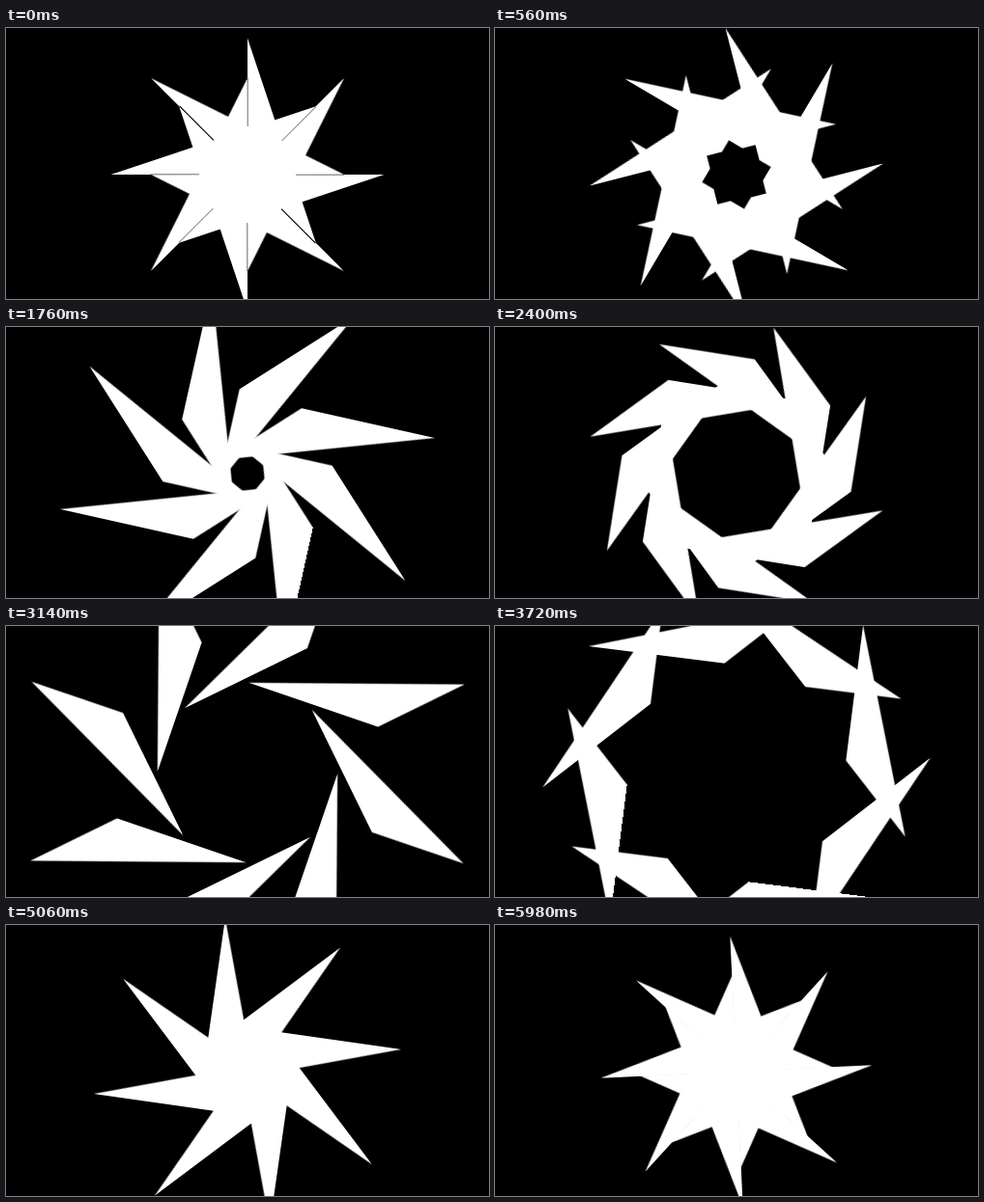
An HTML page that plays this animation: 500x281 px, repeating every 6000 ms.

```html
<!DOCTYPE html>
<html lang="en">
<head>
<meta charset="utf-8">
<title>Eight spinning blades</title>
<style>
  html, body { margin: 0; width: 100%; height: 100%; overflow: hidden; background: #000; }
  svg { display: block; }

  .blade {
    fill: #fff;
    transform-origin: 0 0;
    /* 20 ms ticks: 150 out, 150 back */
    animation: fly 6s steps(150, end) -4ms infinite;
  }
  .seam {
    fill: #999;
    animation: flash 6s step-end -4ms infinite;
  }
  .dark { fill: #000; }

  /* orbit 135deg, spin 675deg, distance 0 - 150 - 0 */
  @keyframes fly {
    0%   { transform: rotate(-45deg)  translateX(0px)   rotate(45deg); }
    50%  { transform: rotate(22.5deg) translateX(150px) rotate(382.5deg); }
    100% { transform: rotate(90deg)   translateX(0px)   rotate(720deg); }
  }
  /* the joints show only while the star is closed */
  @keyframes flash {
    0% { opacity: 1; }
    0.3333%, 100% { opacity: 0; }
  }
</style>
</head>
<body>
<svg width="500" height="281">
  <g id="star" transform="translate(250 152)"></g>
</svg>
<script>
  const star = document.getElementById('star');
  const side = 100, half = side * Math.SQRT1_2;
  const points = `${-2 * half},0 0,0 ${half},${-half}`;
  const turns = Array.from({ length: 8 }, (_, k) => k * 45);

  const ring = part => turns
    .map(a => `<g transform="rotate(${a})">${part(a)}</g>`)
    .join('');

  star.innerHTML =
    ring(() => `<polygon class="blade" points="${points}"/>`) +
    ring(a => `<rect class="seam${a % 180 === 45 ? ' dark' : ''}" x="50" width="50" height="1"/>`);
</script>
</body>
</html>
```
